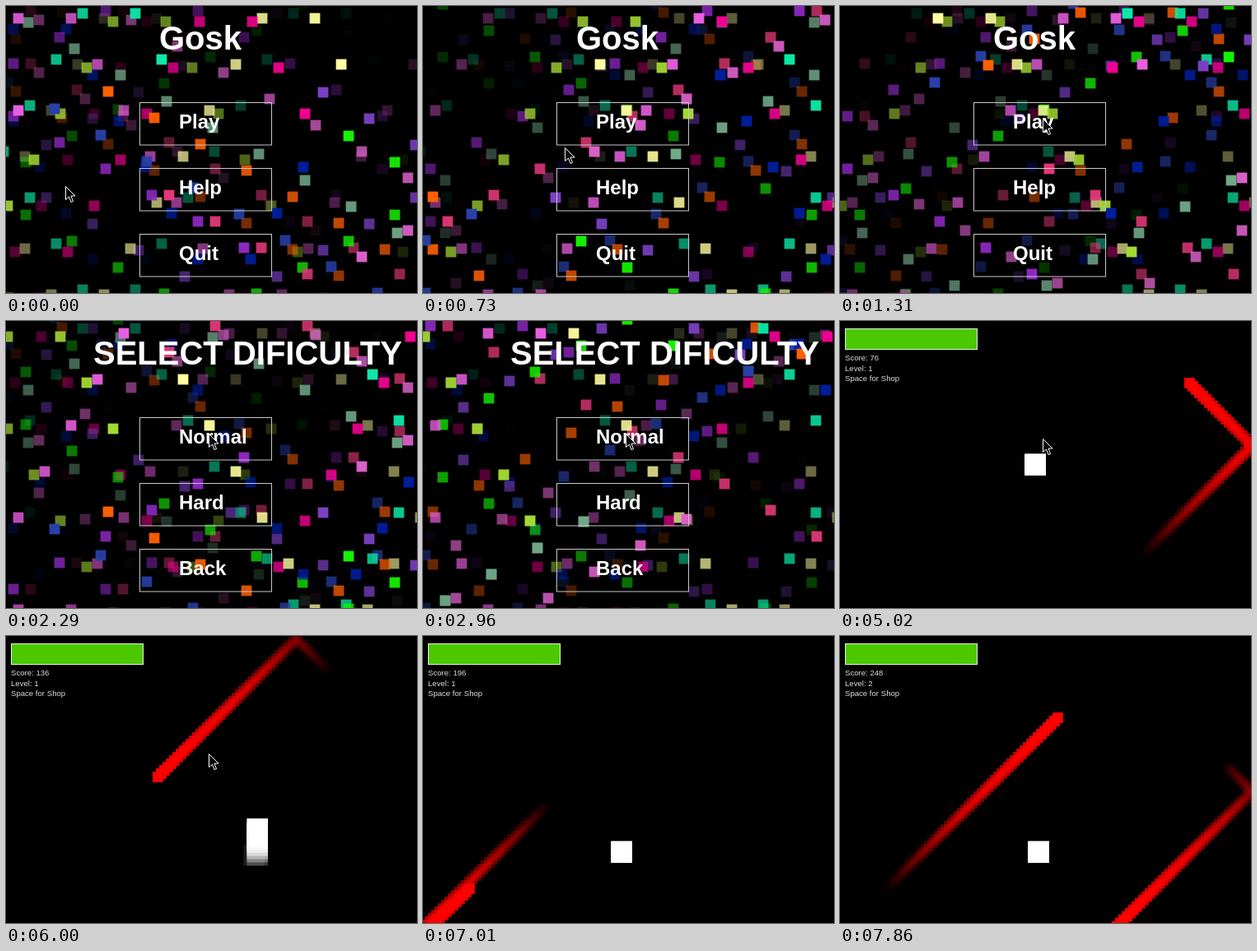
An HTML page with a canvas that plays this animation: 499 px wide and 349 px high, repeating every 8 s.

```html
<!DOCTYPE html>
<html lang="en">
<head>
<meta charset="utf-8">
<title>Arcade menu</title>
<style>
html, body { margin: 0; width: 499px; height: 349px; overflow: hidden; background: #000; }
canvas { display: block; }
</style>
</head>
<body>
<canvas id="stage" width="499" height="349"></canvas>
<script>
const g = document.getElementById('stage').getContext('2d');
const LOOP = 8000, GAME_TICK = 230, LEVEL_UP = 200, SELECT_AT = 1800, CURSOR_OFF = 6880;

// Step of the display, time in ms, game tick
const pace = [[0, 0, 0], [9, 1310, 79], [16, 2290, 140], [25, 3540, 216], [36, 5020, 306],
              [43, 6000, 366], [51, 7140, 435], [52, 7410, 451], [55, 7860, 478]];
const steps = Array.from({ length: 56 }, (_, i) => lerp(pace, i).map(Math.round));

const pointer = [[130, 72, 219], [1170, 246, 137], [2840, 246, 137], [3120, 246, 143]];
// Score, then moves right and down
const walk = [[88, 0, 0], [111, 0, 23], [128, 17, 23], [142, 17, 9], [158, 1, 9], [171, 1, 22]];

// Colour and start; a place past the far wall is on its way back
const particles = {
  flat: [['#70a888', 531, 308], ['#8c28c0', 289, 294], ['#7a40c4', 721, 617], ['#2840a8', 955, 637],
         ['#e03878', 870, 550], ['#d860c8', 656, 305], ['#14f000', 640, 606], ['#ff6000', 908, 616]],
  steep: [['#001e9c', 361, 532], ['#e85ee0', 15, 127], ['#a4d832', 2, 355],
          ['#0ce8a8', 189, 65], ['#ffffa0', 407, 71], ['#f00090', 363, 131]]
};

function lerp(keys, p) {
  if (p <= keys[0][0]) return keys[0].slice(1);
  const i = keys.findIndex(k => k[0] > p);
  if (i < 0) return keys[keys.length - 1].slice(1);
  const a = keys[i - 1], b = keys[i], f = (p - a[0]) / (b[0] - a[0]);
  return a.slice(1).map((v, j) => v + (b[j + 1] - v) * f);
}

// Walls only turn a particle back once it has passed them
function bounce(start, speed, n, min, max) {
  const phase = Math.ceil((start - min) / speed), low = start - phase * speed;
  const count = Math.ceil((max - low) / speed), period = 2 * count;
  const k = ((n + phase) % period + period) % period;
  return low + speed * Math.min(k, period - k);
}

function square(x, y, size, alpha) {
  g.globalAlpha = Math.max(0, alpha);
  g.fillRect(x, y, size, size);
  g.globalAlpha = 1;
}

function text(s, x, y, font, color = '#fff') {
  g.font = font + ' "Liberation Sans", Arial, sans-serif';
  g.fillStyle = color;
  g.fillText(s, x, y);
}

function drawGroup(group, vx, vy, n, alpha) {
  for (const [color, x, y] of group) {
    g.fillStyle = color;
    square(bounce(x, vx, n, 0.4, 499.6) - 6.4, bounce(y, vy, n, 3.4, 359.8) - 6.4, 12.8, alpha);
  }
}

function drawParticles(n) {
  for (let age = 20; age >= 0; age--) {
    drawGroup(particles.flat, 56, 32, n - age, 1 - 0.049 * age);
    drawGroup(particles.steep, 32, 56, n - age, 1 - 0.049 * age);
  }
}

function drawMenu(title, x, labels) {
  text(title, x, 53, 'bold 40px');
  g.strokeStyle = '#c8c8c8';
  labels.forEach((label, i) => {
    g.strokeRect(162.5, 117.5 + 80 * i, 160, 51.5);
    text(label, 210, 149 + 80 * i, 'bold 24px');
  });
}

function drawEnemy(x, y, age) {
  let vx = 5, vy = 5;
  g.fillStyle = '#f00';
  for (let left = age; left >= 0; left--) {
    square(x * 0.8 - 6, y * 0.8 - 3, 12.8, 1 - 0.019 * left);
    x += vx;
    y += vy;
    if (x <= 0 || x >= 624) vx = -vx;
    if (y <= 0 || y >= 445) vy = -vy;
  }
}

function drawPlayer(score) {
  g.fillStyle = '#fff';
  for (let age = 9; age >= 0; age--) {
    const [x, y] = lerp(walk, score - age);
    square(224.4 + 4 * x, 161.8 + 4 * y, 25.6, 1 - 0.099 * age);
  }
}

function drawHud(score) {
  g.fillStyle = '#4bc800';
  g.fillRect(6, 9, 161, 26);
  g.strokeStyle = '#e4f4dc';
  g.strokeRect(6.5, 9.5, 160, 25);
  const lines = ['Score: ' + score, 'Level: ' + (score < LEVEL_UP ? 1 : 2), 'Space for Shop'];
  lines.forEach((s, i) => text(s, 6, 48.4 + 12.2 * i, '9.6px', '#dcdcdc'));
}

function drawPointer(t) {
  const [x, y] = lerp(pointer, t);
  g.save();
  g.translate(Math.round(x) + 0.5, Math.round(y) + 0.5);
  g.lineJoin = 'round';
  g.fillStyle = '#000';
  g.strokeStyle = '#fff';
  const arrow = new Path2D('M0 0V16L4 12.5L6.5 19L9 18L6.5 11.5H11.5Z');
  g.fill(arrow);
  g.stroke(arrow);
  g.restore();
}

function draw(t, n) {
  const score = n - GAME_TICK;
  g.fillStyle = '#000';
  g.fillRect(0, 0, 499, 349);
  if (score < 0) {
    drawParticles(n);
    if (t < SELECT_AT) drawMenu('Gosk', 186, ['Play', 'Help', 'Quit']);
    else drawMenu('SELECT DIFICULTY', 106, ['Normal', 'Hard', 'Back']);
  } else {
    drawPlayer(score);
    drawEnemy(340, 420, score);
    if (score >= LEVEL_UP) drawEnemy(590, 197, score - LEVEL_UP);
    drawHud(score);
  }
  if (t < CURSOR_OFF) drawPointer(t);
}

const start = performance.now();
function tick() {
  const t = (performance.now() - start) % LOOP;
  draw(...steps.filter(s => s[0] <= t).pop());
  requestAnimationFrame(tick);
}
tick();
</script>
</body>
</html>
```
